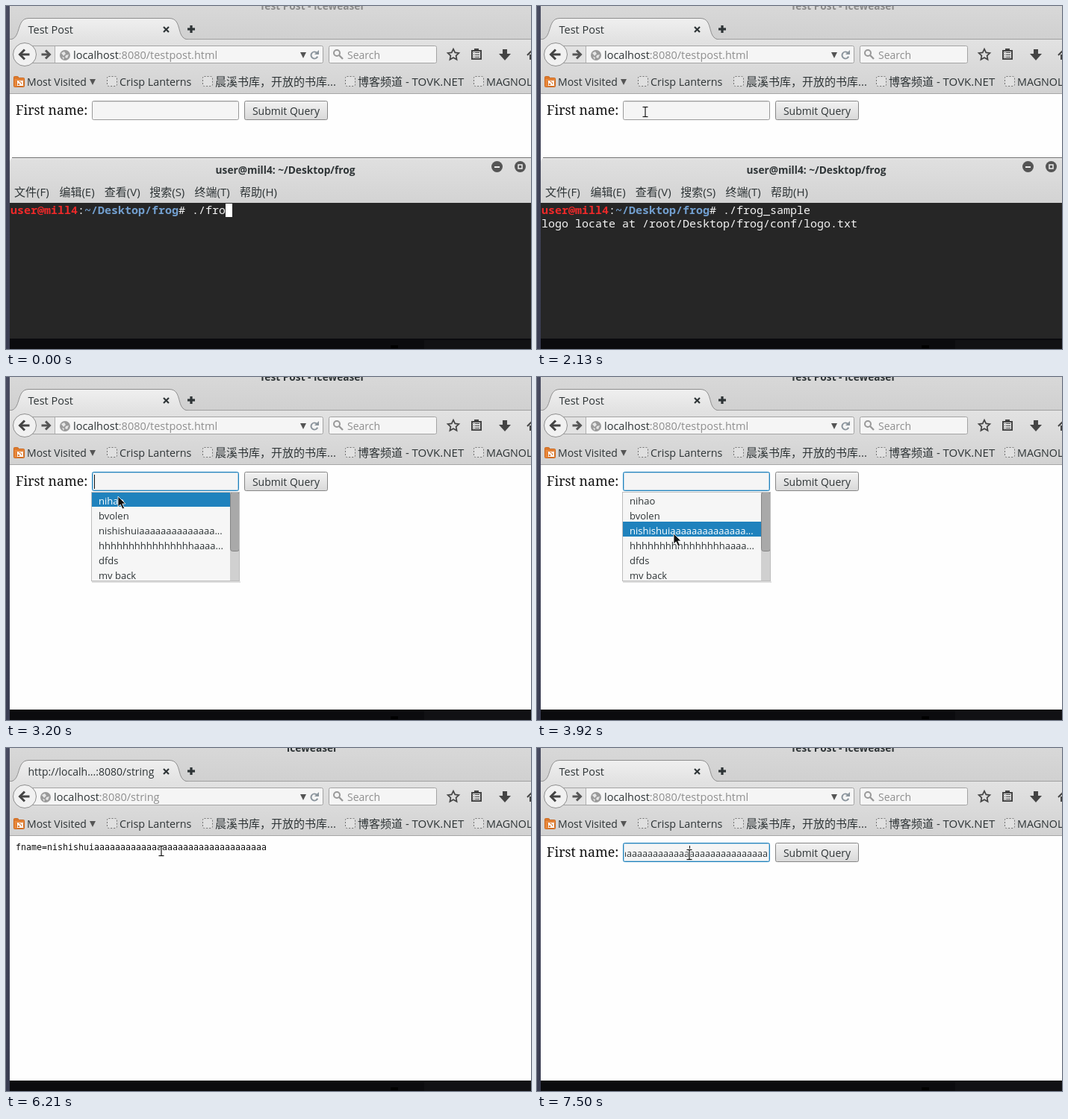
Recreate the animation shown at these times as an HTML page with a canvas. Size 703x460 px, loop 8 s.

```html
<!DOCTYPE html>
<html lang="zh">
<head>
<meta charset="utf-8">
<title>Test Post</title>
<style>
html, body { margin: 0; width: 100%; height: 100%; overflow: hidden; }
canvas { display: block; }
</style>
</head>
<body>
<canvas id="stage" width="703" height="460"></canvas>
<script>
const c = document.getElementById('stage').getContext('2d');
const LOOP = 8000;
const UI = '"Open Sans", "Noto Sans CJK SC", sans-serif';
const MONO = '"Noto Sans Mono", monospace';
const PLAIN = '"DejaVu Sans Mono", monospace';
const SERIF = '"Noto Serif", serif';
const INK = '#2e3436', GREY = '#8e8e8e', BLUE = '#1f82bd', ICON = '#444';
const HOST = 'user@mill4', DIR = '~/Desktop/frog';
const VALUE = 'nishishui' + 'a'.repeat(33);
const OPTIONS = ['nihao', 'bvolen', 'nishishui' + 'a'.repeat(14) + '...',
  'h'.repeat(16) + 'aaaa...', 'dfds', 'mv back'];

// Pointer: time, x, y, 1 for the text beam
const POINTER = [
  [1830, 300, 190, 0], [1980, 190, 158, 0], [2130, 145, 142, 1], [2280, 143, 141, 0],
  [3050, 145, 148, 0], [3200, 150, 160, 0], [3350, 157, 170, 0], [3500, 164, 181, 0],
  [3640, 171, 190, 0], [3780, 178, 201, 0], [3920, 183, 210, 0],
  [4730, 195, 195, 0], [4850, 225, 172, 0], [4970, 258, 150, 1], [5090, 289, 136, 1],
  [5210, 320, 136, 0], [5370, 350, 140, 0], [5520, 372, 144, 0],
  [5970, 335, 145, 0], [6090, 272, 140, 1], [6210, 208, 138, 1], [6330, 130, 112, 0],
  [6480, 62, 82, 0], [6600, 28, 66, 0],
  [6840, 40, 76, 0], [6960, 76, 96, 0], [7080, 122, 120, 0], [7230, 165, 136, 1],
  [7350, 192, 141, 1], [7500, 204, 143, 1]
];

function rect(x, y, w, h, fill) {
  c.fillStyle = fill;
  c.fillRect(x, y, w, h);
}
function box(x, y, w, h, r, fill, stroke) {
  c.beginPath();
  c.roundRect(x + .5, y + .5, w - 1, h - 1, r);
  c.fillStyle = fill;
  c.fill();
  c.strokeStyle = stroke;
  c.lineWidth = 1;
  c.stroke();
}
function shade(y0, y1, a, b) {
  const g = c.createLinearGradient(0, y0, 0, y1);
  g.addColorStop(0, a);
  g.addColorStop(1, b);
  return g;
}
function text(s, x, y, size = 14, color = INK, family = UI, weight = '', align = 'left') {
  c.font = `${weight} ${size}px ${family}`;
  c.textAlign = align;
  c.fillStyle = color;
  c.fillText(s, x, y);
  return x + c.measureText(s).width;
}
function poly(points, fill) {
  c.beginPath();
  points.forEach(([x, y]) => c.lineTo(x, y));
  c.closePath();
  c.fillStyle = fill;
  c.fill();
}
function line(points, color, width = 1) {
  c.beginPath();
  points.forEach(([x, y], i) => i ? c.lineTo(x, y) : c.moveTo(x, y));
  c.strokeStyle = color;
  c.lineWidth = width;
  c.stroke();
}
function disc(x, y, r, fill, stroke) {
  c.beginPath();
  c.arc(x, y, r, 0, 7);
  c.fillStyle = fill;
  c.fill();
  if (stroke) {
    c.strokeStyle = stroke;
    c.lineWidth = 1;
    c.stroke();
  }
}
function arrow(x, y, dir, s, color) {
  line([[x - dir * s, y], [x + dir * (s - 1), y]], color, 3);
  line([[x, y - s], [x + dir * s, y], [x, y + s]], color, 3);
}
const down = (x, y, color) => poly([[x - 4, y - 4], [x + 4, y - 4], [x, y + 4]], color);

function globe(x, y) {
  disc(x, y, 7, '#9a9a9a');
  poly([[x - 5, y - 3], [x - 1, y - 5], [x + 1, y - 2], [x - 2, y + 1]], '#e6e6e6');
  poly([[x + 1, y], [x + 5, y - 1], [x + 3, y + 4], [x, y + 3]], '#e6e6e6');
  poly([[x - 4, y + 2], [x - 1, y + 3], [x - 2, y + 6]], '#e6e6e6');
}
function lens(x, y) {
  c.beginPath();
  c.arc(x, y, 4, 0, 7);
  c.strokeStyle = '#999';
  c.lineWidth = 2;
  c.stroke();
  line([[x + 3, y + 3], [x + 8, y + 8]], '#999', 2.4);
}
function star(x, y) {
  c.beginPath();
  for (let i = 0; i < 10; i++) {
    const r = i % 2 ? 3.8 : 7.8, a = i * Math.PI / 5 - Math.PI / 2;
    c.lineTo(x + r * Math.cos(a), y + r * Math.sin(a));
  }
  c.closePath();
  c.strokeStyle = ICON;
  c.lineWidth = 1.7;
  c.stroke();
}
function clipboard(x, y) {
  rect(x, y + 2, 14, 13, ICON);
  rect(x + 4, y, 6, 3, ICON);
  rect(x + 2, y + 4, 10, 9, '#e2e2e2');
  for (let i = 0; i < 3; i++) {
    rect(x + 3, y + 5 + 3 * i, 1, 1, ICON);
    rect(x + 5, y + 5 + 3 * i, 6, 1, ICON);
  }
}

function tabBar(onForm, active) {
  rect(5, 0, 698, 45, shade(0, 45, '#d8d8d8', '#d0d0d0'));
  text(onForm ? 'Test Post - Iceweasel' : 'Iceweasel', 409, 5, 13.7,
    active ? INK : '#8a8a8a', UI, 'bold', 'center');
  rect(5, 44, 698, 1, '#a0a0a0');
  c.beginPath();
  c.moveTo(5, 45);
  c.bezierCurveTo(21, 44, 13, 17, 30, 16.5);
  c.lineTo(219, 16.5);
  c.bezierCurveTo(237, 17, 227, 44, 244, 45);
  c.fillStyle = shade(16, 45, '#f0f0f0', '#e2e2e2');
  c.fill();
  c.strokeStyle = '#8f8f8f';
  c.lineWidth = 1;
  c.stroke();
  text(onForm ? 'Test Post' : 'http://localh...:8080/string', 29.5, 37, onForm ? 14.5 : 14);
  line([[211, 28], [218, 35]], INK, 2.2);
  line([[218, 28], [211, 35]], INK, 2.2);
  line([[243, 31], [253, 31]], INK, 3.2);
  line([[248, 26], [248, 36]], INK, 3.2);
}

function toolbar(onForm) {
  rect(5, 45, 698, 72, shade(45, 117, '#e2e2e2', '#d2d2d2'));
  rect(5, 117, 698, 1, '#a6a6a6');
  box(32, 53, 393, 24, 2, '#f5f5f5', '#a3a3a3');
  if (onForm) {
    rect(33, 54, 32, 22, '#e2e2e2');
    rect(65, 54, 1, 22, '#b0b0b0');
    arrow(53, 65, 1, 5.5, '#555');
  }
  disc(25, 65, 15.5, '#f1f1f1', '#8d8d8d');
  arrow(25, 65, -1, 6.5, ICON);
  globe(onForm ? 79 : 53, 66);
  const end = text('localhost', onForm ? 90 : 64, 71, 14.5);
  text(onForm ? ':8080/testpost.html' : ':8080/string', end, 71, 14.5, GREY);
  down(398, 66, '#555');
  c.beginPath();
  c.arc(413, 66, 4.5, .4, 5.4);
  c.strokeStyle = '#8a949c';
  c.lineWidth = 2;
  c.stroke();
  poly([[413, 65], [419, 65], [419, 59]], '#8a949c');

  box(432, 53, 145, 24, 2, '#f5f5f5', '#a3a3a3');
  lens(443, 63);
  text('Search', 457, 71, 14, GREY);
  star(599, 65.5);
  clipboard(623, 57);
  rect(665, 58, 6, 7, ICON);
  poly([[660, 64], [676, 64], [668, 73]], ICON);
  line([[698, 66], [706, 58]], ICON, 2);
  rect(701, 65, 2, 7, ICON);
}

function bookmarks() {
  box(10, 94, 7, 5, 1, '#e8873a', '#c9651b');
  box(10, 96, 15, 13, 1, '#e8873a', '#c9651b');
  box(14, 99, 10, 9, 1, '#fff', '#d87429');
  disc(17, 105, 1.3, '#d87429');
  c.beginPath();
  c.arc(17, 105, 4, -1.57, 0);
  c.strokeStyle = '#d87429';
  c.stroke();
  text('Most Visited', 28, 107);
  down(116, 102, '#555');
  const marks = [[135, 'Crisp Lanterns'], [263, '晨溪书库，开放的书库...'],
    [454, '博客频道 - TOVK.NET'], [626, 'MAGNOLIA']];
  for (const [x, name] of marks) {
    c.setLineDash([2, 2]);
    box(x, 94, 14, 14, 2, '#e0e0e0', '#707070');
    c.setLineDash([]);
    text(name, x + 17, 107, /[^ -~]/.test(name) ? 15 : 14.3);
  }
}

function form(t) {
  const focus = t >= 2280, filled = t >= 4580;
  text('First name:', 13, 146, 17.8, '#111', SERIF, '300');
  box(115, 127, 197, 26, 2, '#f5f5f5', focus ? BLUE : '#999');
  if (focus) {
    c.strokeStyle = 'rgba(31,130,189,.35)';
    c.strokeRect(116.5, 128.5, 194, 23);
  } else rect(117, 128, 193, 1, '#dcdcdc');
  if (filled) {
    c.save();
    c.beginPath();
    c.rect(118, 129, 192, 22);
    c.clip();
    text(VALUE, 309, 146, 12.6, INK, UI, '', 'right');
    c.restore();
  }
  if (t >= 7500) rect(204, 131, 1, 19, '#111');
  else if (filled) rect(309, 131, 1, 19, '#111');
  else if (focus && t < 3350) rect(118, 131, 1, 19, '#111');

  const hover = t >= 5210 && t < 5670;
  box(319, 127, 112, 26, 2,
    hover ? shade(127, 153, '#fcfcfc', '#e8e8e8') : shade(127, 153, '#f3f3f3', '#d8d8d8'), '#868686');
  text('Submit Query', 375, 146, 14, INK, UI, '', 'center');
}

function dropdown(pick) {
  rect(115, 274, 199, 2, 'rgba(0,0,0,.12)');
  rect(114, 154, 199, 120, '#f6f6f6');
  c.save();
  c.beginPath();
  c.rect(114, 154, 186, 119);
  c.clip();
  OPTIONS.forEach((s, i) => {
    if (i === pick) rect(114, 154 + 20 * i, 186, 20, BLUE);
    text(s, 124, 171 + 20 * i, 13, i === pick ? '#fff' : INK);
  });
  c.restore();
  rect(300, 154, 13, 120, '#d0d0d0');
  box(300, 154, 13, 80, 3, '#a9a9a9', '#858585');
  c.strokeStyle = '#bdbdbd';
  c.strokeRect(114.5, 154.5, 198, 119);
}

function terminal(t) {
  c.beginPath();
  c.roundRect(5, 203, 705, 61, [6, 0, 0, 0]);
  c.fillStyle = shade(203, 264, '#e0e0e0', '#d3d3d3');
  c.fill();
  rect(8, 203, 695, 1, '#6a6a6a');
  rect(7, 204, 696, 1, '#f2f2f2');
  text(`${HOST}: ${DIR}`, 374, 225, 13.7, INK, UI, 'bold', 'center');
  disc(657.5, 215.5, 7.5, '#555');
  rect(654, 215, 7, 2, '#eee');
  disc(688.5, 215.5, 7.5, '#555');
  c.strokeStyle = '#eee';
  c.lineWidth = 1.5;
  c.strokeRect(686, 213, 5, 5);
  ['文件(F)', '编辑(E)', '查看(V)', '搜索(S)', '终端(T)', '帮助(H)']
    .forEach((s, i) => text(s, 11 + 60.4 * i, 255, 15));

  rect(5, 264, 698, 182, '#262626');
  const cell = n => 6 + 9 * n;
  const mono = (s, n, y, color = '#f4f4f4', weight = '') => text(s, cell(n), y, 15, color, MONO, weight);
  mono(HOST, 0, 279, '#ef2929', 'bold');
  mono(':', 10, 279);
  mono(DIR, 11, 279, '#729fcf', 'bold');
  mono('# ./' + (t < 280 ? 'fro' : 'frog_sample'), 25, 279);
  if (t >= 1050) mono('logo locate at /root/Desktop/frog/conf/logo.txt', 0, 297);
  const [col, row] = t < 280 ? [32, 0] : t < 900 ? [41, 0] : t < 1050 ? [0, 1] : [0, 2];
  if (t < 1550) rect(cell(col), 265 + 18 * row, 9, 18, '#fff');
}

function pointer([, x, y, beam]) {
  if (beam) {
    for (const [color, w] of [['#fff', 3], ['#111', 1.2]]) {
      line([[x, y - 6], [x, y + 6]], color, w);
      line([[x - 3.5, y - 6.5], [x + 3.5, y - 6.5]], color, w);
      line([[x - 3.5, y + 6.5], [x + 3.5, y + 6.5]], color, w);
    }
    return;
  }
  const shape = [[0, 0], [0, 14], [3.2, 11], [6, 17], [8.6, 16], [5.8, 10], [10, 10]]
    .map(([dx, dy]) => [x + dx, y + dy]);
  poly(shape, '#111');
  c.strokeStyle = '#fff';
  c.lineWidth = .8;
  c.stroke();
}

function draw(t) {
  const onForm = t < 5670 || t >= 6720;
  const mouse = POINTER.findLast(p => p[0] <= t);
  rect(0, 0, 703, 460, '#0b0b0e');
  rect(0, 0, 5, 460, shade(0, 460, '#484b60', '#3a3d52'));
  tabBar(onForm, t >= 2280);
  toolbar(onForm);
  bookmarks();
  rect(5, 118, 698, 328, '#fefefe');
  rect(515, 455, 10, 4, '#000');
  rect(560, 448, 143, 12, '#111114');
  if (onForm) form(t);
  else text('fname=' + VALUE, 13, 137, 11.63, '#111', PLAIN);
  if (t < 2280) terminal(t);
  if (t >= 2430 && t < 4580) dropdown(Math.floor((mouse[2] - 154) / 20));
  if (mouse) pointer(mouse);
}

const start = performance.now();
function tick() {
  draw((performance.now() - start) % LOOP);
  requestAnimationFrame(tick);
}
tick();
</script>
</body>
</html>
```
